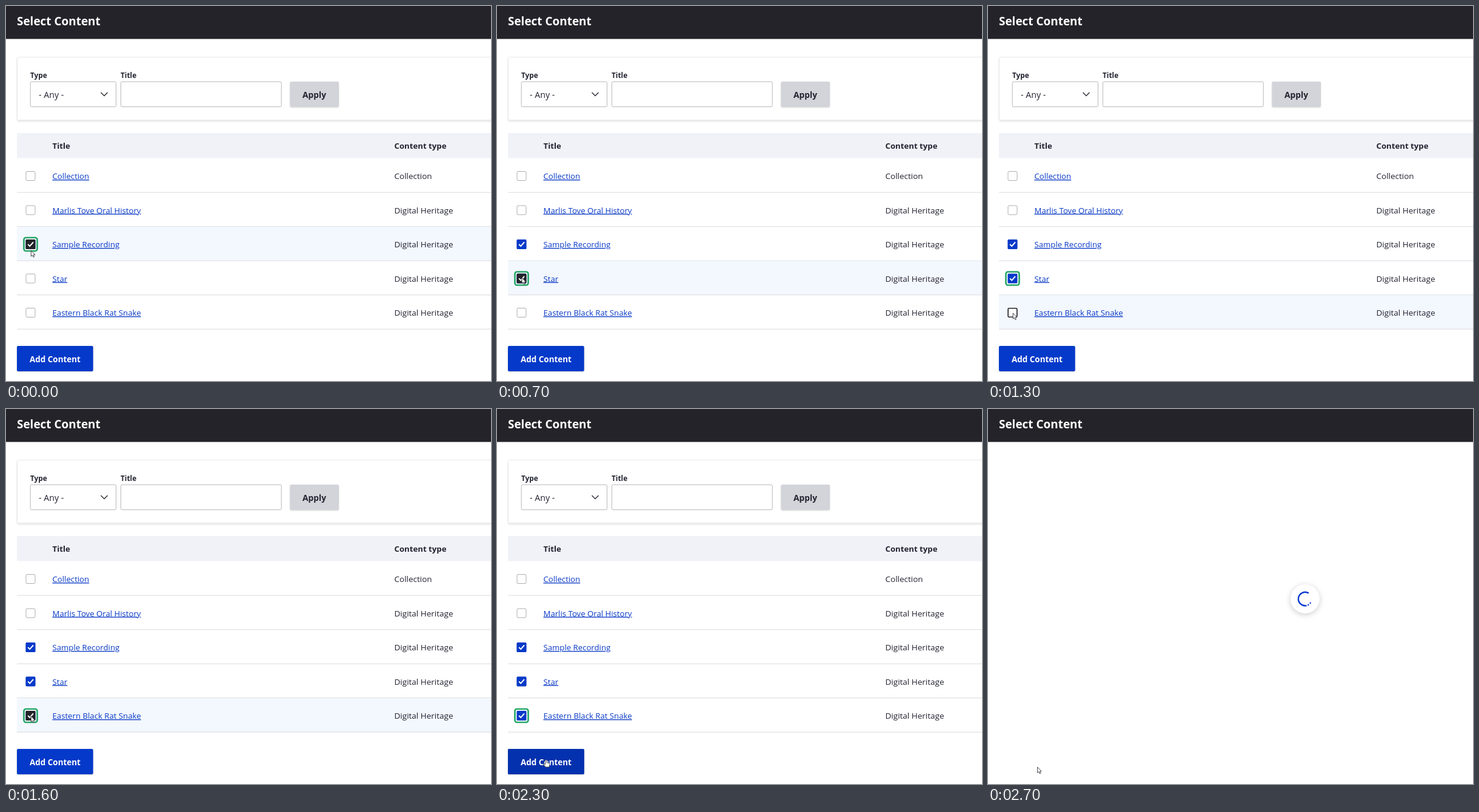
Animation of 800 by 620 pixels, one loop 2800 ms. Source, as an HTML page:

```html
<!DOCTYPE html>
<html lang="en">
<head>
<meta charset="utf-8">
<title>Select Content</title>
<style>
  html, body { margin: 0; width: 100%; height: 100%; overflow: hidden; background: #fff; }
  svg { display: block; width: 800px; height: 620px; }
  text { font: 13.5px "Open Sans", "Noto Sans", sans-serif; fill: #222330; }
  .bold { font-weight: 700; font-size: 13.2px; }
  .label { font-weight: 700; font-size: 11.8px; }
  .light { fill: #fff; }
  .link { font-size: 13.2px; fill: #0a3ac6; text-decoration: underline; text-decoration-thickness: 1px; text-underline-offset: 1px; }
  .field { fill: #fff; stroke: #b8b8bd; }
  .line { stroke: #d9dae0; }
  .hover { fill: #f3f7fe; }
  .box { fill: #fff; stroke: #aeaeb3; }
  .dark-edge { fill: #fff; stroke: #232429; stroke-width: 1.6; }
  .blue { fill: #0539c9; }
  .dark { fill: #232429; }
  .tick { fill: none; stroke: #fff; stroke-width: 1.9; }
  .ring { fill: #fff; stroke: #26a769; stroke-width: 2.65; }
  .pointer { fill: #fff; stroke: #33343c; stroke-width: .9; stroke-linejoin: round; }
  .arc { fill: none; stroke: #0a3bd0; stroke-width: 2.4; }
  .soft { filter: drop-shadow(0 1px 1px rgba(0, 0, 0, .16)); }
  .card { fill: #fff; stroke: #e9e9ed; filter: drop-shadow(0 2px 1.5px rgba(0, 0, 0, .1)); }
  .float { filter: drop-shadow(0 2px 5px rgba(0, 0, 0, .2)); }
</style>
</head>
<body>
<svg viewBox="0 0 800 620">
  <rect width="800" height="54.5" fill="#232329"/>
  <text class="bold light" x="18" y="32" style="font-size:18.95px">Select Content</text>

  <g data-on="0-2700">
    <rect class="card" x="18.5" y="84.5" width="800" height="104" rx="2"/>
    <text class="label" x="40" y="119">Type</text>
    <text class="label" x="189" y="119">Title</text>
    <rect class="field" x="40.2" y="125.2" width="141.3" height="41.4" rx="2"/>
    <text x="54" y="152" style="font-size:14.2px">- Any -</text>
    <path d="M156.5 143l5.5 5.5 5.5-5.5" fill="none" stroke="#33343c" stroke-width="1.5"/>
    <rect class="field" x="189.4" y="125.2" width="264.8" height="41.4" rx="2"/>
    <rect class="soft" x="468.5" y="125" width="80.5" height="42" rx="2" fill="#d3d4d9"/>
    <text class="bold" x="489" y="151.5" style="font-size:13.8px">Apply</text>

    <rect x="18" y="210" width="782" height="41.5" fill="#f1f2f8"/>
    <text class="bold" x="76.5" y="236">Title</text>
    <text class="bold" x="640.5" y="236">Content type</text>
    <g id="rows"></g>

    <path class="ring" data-on="2500-2700" d="M18 559.3H143.5q3 0 3 3V603.7q0 3-3 3H18"/>
    <rect class="blue soft" x="18" y="562" width="125.7" height="42" rx="2"/>
    <rect data-on="1900-2700" x="18" y="562" width="125.7" height="42" rx="2" fill="#0431ae"/>
    <text class="bold light" x="39" y="588.5" style="font-size:13.45px">Add Content</text>
  </g>

  <g data-on="2700-2800">
    <circle class="float" cx="523" cy="314" r="24" fill="#fff"/>
    <path class="arc" d="M529 304.5A11.2 11.2 0 1 0 525.5 325"/>
    <circle class="blue" cx="528.3" cy="323.7" r="1.3"/>
    <circle class="blue" cx="531.7" cy="320.8" r="1.2"/>
  </g>

  <g id="cursor">
    <path class="pointer" data-on="0-1900 2700-2800" d="M0 0V9.5L2.2 7.6 3.8 10.9 5.3 10.2 3.8 7H6.6Z"/>
    <path class="pointer" data-on="1900-2700" d="M-1.2 1a1.2 1.2 0 0 1 2.4 0V4.5L4.7 5.3Q6.2 5.8 6 7.5L5 12H-.8L-4 8.3Q-4.6 6.5-3 6.6L-1.2 8Z"/>
  </g>
</svg>
<script>
const LOOP = 2800, TICK = 100;

// title, type, and the time spans of each state
const rows = [
  { title: 'Collection', type: 'Collection' },
  { title: 'Marlis Tove Oral History' },
  { title: 'Sample Recording', hover: '0-500', on: '0-2700', dark: '0-200', ring: '0-700' },
  { title: 'Star', hover: '300-1200', edge: '300-700', on: '700-2700', dark: '700-1000', ring: '700-1500' },
  { title: 'Eastern Black Rat Snake', hover: '1000-2100', edge: '1200-1500', on: '1500-2700', dark: '1500-1900', ring: '1500-2500' }
];

// time, x, y
const path = [
  [0, 41.4, 404.4], [100, 41.4, 407], [200, 41.4, 425], [300, 41.2, 443], [400, 41, 449.2],
  [1000, 41.4, 466], [1100, 41.4, 486.8], [1200, 41.4, 502], [1300, 41.2, 507.7],
  [1800, 46, 515], [1900, 70, 568], [2000, 81, 580], [2500, 83, 593], [2700, 81.6, 592]
];

const square = (cls, span, half, rx) => span
  ? `<rect class="${cls}" data-on="${span}" x="${-half}" y="${-half}" width="${2 * half}" height="${2 * half}" rx="${rx}"/>` : '';

function rowMarkup({ title, type = 'Digital Heritage', hover, edge, on, dark, ring }, i) {
  const y = 281 + i * 56.5;
  return `<g transform="translate(0 ${y})">
    ${hover ? `<rect class="hover" data-on="${hover}" x="18" y="-29" width="782" height="56"/>` : ''}
    <path class="line" d="M18 27.2H800"/>
    <text class="link" x="76.5" y="5">${title}</text>
    <text x="640.5" y="5">${type}</text>
    <g transform="translate(40.5 0)">
      ${square('box', '0-2700', 7.5, 2)}
      ${square('ring', ring, 11, 3.5)}
      ${square('dark-edge', edge, 7.3, 1.5)}
      ${square('blue', on, 8, 1.5)}
      ${square('dark', dark, 8, 1.5)}
      ${on ? `<path class="tick" data-on="${on}" d="M-4.3 0L-1.3 3.1 4.5-3.5"/>` : ''}
    </g>
  </g>`;
}

document.getElementById('rows').innerHTML = rows.map(rowMarkup).join('');

const cursor = document.getElementById('cursor');
const parts = [...document.querySelectorAll('[data-on]')].map(el => ({
  el, spans: el.dataset.on.split(' ').map(s => s.split('-').map(Number))
}));

function draw(t) {
  for (const { el, spans } of parts) {
    el.style.display = spans.some(([a, b]) => t >= a && t < b) ? '' : 'none';
  }
  const [, x, y] = path.findLast(([at]) => at <= t);
  cursor.setAttribute('transform', `translate(${x} ${y})`);
}

const start = performance.now();
function frame() {
  const t = (performance.now() - start) % LOOP;
  draw(Math.floor(t / TICK) * TICK);
  requestAnimationFrame(frame);
}
frame();
</script>
</body>
</html>
```
